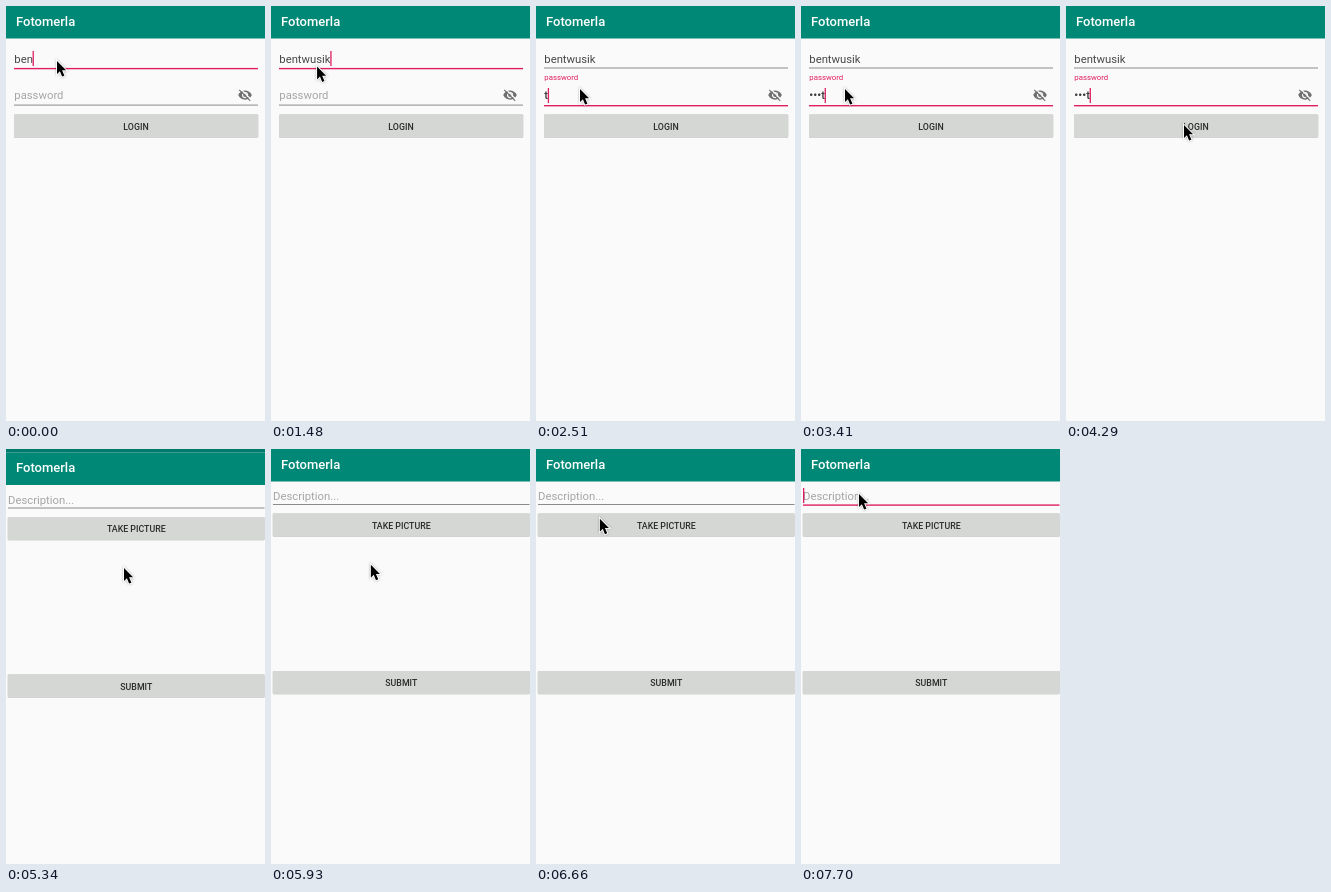
These frames come from a looping animation (259x415 px, 8 s). An HTML page:

```html
<!DOCTYPE html>
<html lang="en">
<head>
<meta charset="utf-8">
<title>Login screen</title>
<style>
  html, body { margin: 0; width: 100%; height: 100%; overflow: hidden; background: #fafafa; }
  svg { display: block; width: 259px; height: 415px; }
  text { font: 11.3px Roboto, sans-serif; fill: #484848; }
  .title { font-size: 13px; font-weight: 500; fill: #fff; }
  .btn text { font-size: 8.8px; font-weight: 500; fill: #2b2b2b; text-anchor: middle; }
  .btn rect { fill: #d5d7d5; filter: drop-shadow(0 .2px .6px rgba(0, 0, 0, .25)); }
  .hint { fill: #a5a5a5; }
  .bar { fill: #008876; }
  .line { fill: #8c8c8c; }
  .line.on { fill: #e01e63; transform: translateY(.4px); }
  #caret { fill: #e01e63; }
  #pass { font-weight: 500; fill: #3a3a3a; }
</style>
</head>
<body>
<svg viewBox="0 0 259 415">
  <rect width="259" height="415" fill="#fafafa"/>

  <g id="login">
    <rect class="bar" width="259" height="32.5"/>
    <text class="title" x="10" y="19.5">Fotomerla</text>
    <text id="user" x="8.3" y="57"></text>
    <rect id="userLine" class="line" x="8" width="244" y="61.5"/>
    <text id="passHint" x="8.3">password</text>
    <text id="pass" x="8.3" y="93.3"></text>
    <rect id="passLine" class="line" x="8" width="244" y="98.6"/>
    <g transform="translate(231.6 81.6) scale(.62)">
      <path fill="#707070" fill-rule="evenodd"
        d="M1 12C5 2 19 2 23 12C19 22 5 22 1 12ZM7 12a5 5 0 0 0 10 0a5 5 0 0 0 -10 0Z"/>
      <circle cx="12" cy="12" r="3" fill="#707070"/>
      <path d="M4.4 1.8L22.2 19.6" stroke="#fafafa" stroke-width="1.8"/>
      <path d="M2.6 3.6L20.4 21.4" stroke="#707070" stroke-width="1.8"/>
    </g>
    <g class="btn">
      <rect id="loginBtn" x="8" y="108.4" width="244.2" height="23.4" rx="1"/>
      <text x="130" y="123.5">LOGIN</text>
    </g>
  </g>

  <g id="post">
    <rect width="259" height="415" fill="#fafafa"/>
    <rect class="bar" width="259" height="32.5"/>
    <text class="title" x="10" y="19.5">Fotomerla</text>
    <text class="hint" x="2" y="51">Description...</text>
    <rect id="descLine" class="line" x="2" width="256.5" y="55"/>
    <g class="btn">
      <rect x="1.8" y="64.4" width="256.8" height="23.4" rx="1"/>
      <text x="130.3" y="79.5">TAKE PICTURE</text>
      <rect x="1.8" y="221.9" width="256.8" height="23.4" rx="1"/>
      <text x="130.3" y="237">SUBMIT</text>
    </g>
  </g>
  <rect id="strip" width="259" fill="#007b6b"/>

  <rect id="caret" width="1.3" height="15"/>
  <path id="mouse" d="M0 0V13L2.9 10.2L5.1 15.6L7.4 14.7L5.1 9.3H9.1Z"
    stroke="#fff" stroke-width="1.8" paint-order="stroke"
    style="filter:drop-shadow(0 .8px .8px rgba(0,0,0,.3))"/>
</svg>
<script>
const LOOP = 8000, TICKS = 54;   // the screen refreshes in coarse ticks
const NAME = 'bentwusik', PASS = 'test';

// Moments below are all in ticks.
const NAME_KEYS = [1, 3, 5, 6, 7, 8];
const PASS_KEYS = [...PASS].map((_, i) => 17 + 2 * i);
const PASS_FOCUS = 13, MASK_ALL = 33, NEW_SCREEN = 36, DESC_FOCUS = 50;
const CARET_WAKES = [0, ...NAME_KEYS, PASS_FOCUS + 1, ...PASS_KEYS, DESC_FOCUS];

const START = { x: 51, y: 55 };
const MOVES = [
  { from: 9, to: 12, x: 44, y: 83 },
  { from: 24, to: 29, x: 118, y: 119 },
  { from: 39, to: 47, x: 63, y: 43 },
  { from: 47, to: 49, x: 58, y: 45 }
];

const $ = id => document.getElementById(id);
const clamp = v => Math.min(1, Math.max(0, v));
const pressed = (keys, k) => keys.filter(at => at <= k).length;

function set(id, attrs) {
  for (const name in attrs) $(id).setAttribute(name, attrs[name]);
}

function setLine(id, on) {
  $(id).classList.toggle('on', on);
  set(id, { height: on ? 1.4 : 1 });
}

// Sideways motion brakes early, vertical motion builds up: a curved path.
function mouseAt(k) {
  let { x, y } = START;
  for (const m of MOVES) {
    const p = clamp((k - m.from) / (m.to - m.from));
    x += (m.x - x) * (1 - (1 - p) ** 3);
    y += (m.y - y) * p ** 1.5;
  }
  return `translate(${x} ${y})`;
}

// The last typed letter stays readable for a while.
function maskedPass(k) {
  const n = pressed(PASS_KEYS, k);
  return k >= MASK_ALL || !n ? '•'.repeat(n) : '•'.repeat(n - 1) + PASS[n - 1];
}

function caretOn(k) {
  const since = k - CARET_WAKES.findLast(at => at <= k);
  return Math.floor((since + .75) / 3.3) % 2 === 0;
}

function draw(k) {
  const onPass = k >= PASS_FOCUS, onPost = k >= NEW_SCREEN, onDesc = k >= DESC_FOCUS;

  $('user').textContent = NAME.slice(0, 3 + pressed(NAME_KEYS, k));
  $('pass').textContent = maskedPass(k);
  setLine('userLine', !onPass);
  setLine('passLine', onPass);
  setLine('descLine', onDesc);

  const up = clamp((k - PASS_FOCUS + 1) / 2);
  set('passHint', { y: 93 - 19 * up });
  $('passHint').style.fontSize = 11.3 - 3.5 * up + 'px';
  $('passHint').style.fill = onPass ? '#e01e63' : '#a5a5a5';
  $('loginBtn').style.fill = k === 30 || k === 31 ? '#cfd1cf' : '';

  const slide = onPost ? 3.5 * clamp((NEW_SCREEN + 2 - k) / 2) ** 2 : 0;
  $('login').style.display = onPost ? 'none' : '';
  $('post').style.display = onPost ? '' : 'none';
  set('post', { transform: `translate(0 ${slide})` });
  set('strip', { height: slide });

  const field = $(onPass ? 'pass' : 'user');
  const width = field.textContent ? field.getComputedTextLength() : 0;
  set('caret', {
    x: onPost ? 2 : 8 + width,
    y: onPost ? 39 : onPass ? 82 : 45,
    opacity: caretOn(k) && (!onPost || onDesc) && k !== PASS_FOCUS ? 1 : 0
  });
  set('mouse', { transform: mouseAt(k) });
}

const start = performance.now();
let shown = -1;
function frame() {
  const t = (performance.now() - start) % LOOP;
  const k = Math.floor((t + 10) / LOOP * TICKS) % TICKS;
  if (k !== shown) draw(shown = k);
  requestAnimationFrame(frame);
}
document.fonts.ready.then(() => { shown = -1; });
frame();
</script>
</body>
</html>
```
